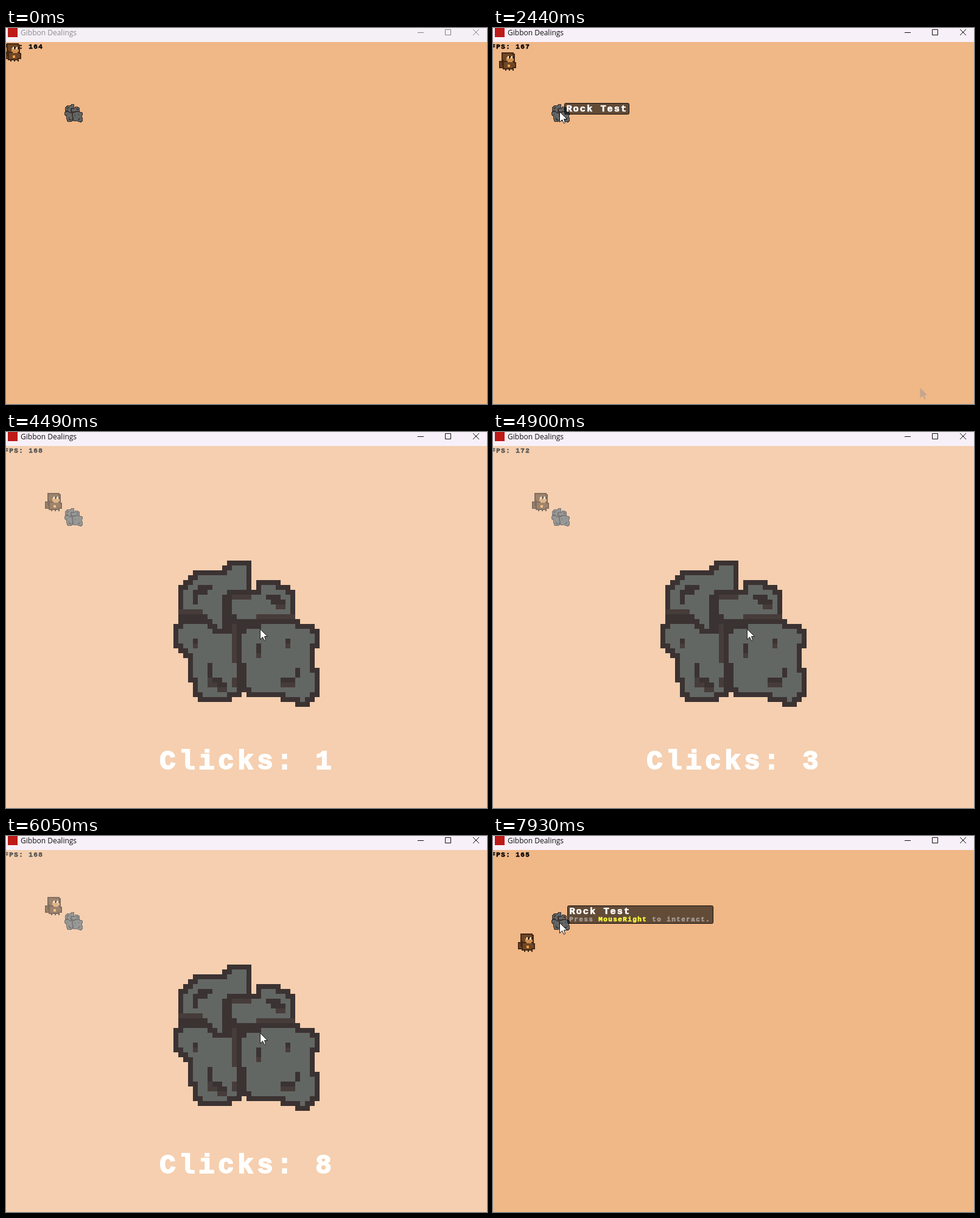
These frames come from a looping animation (790x617 px, 8 s). An HTML page with a canvas:

```html
<!DOCTYPE html>
<html lang="en">
<head>
<meta charset="utf-8">
<title>Gibbon Dealings</title>
<style>
  html, body { margin: 0; width: 100%; height: 100%; overflow: hidden; background: #f0b787; }
  canvas { display: block; }
</style>
</head>
<body>
<canvas id="stage" width="790" height="617"></canvas>
<script>
const ctx = document.getElementById('stage').getContext('2d');
const LOOP = 8000, FOCUS = 2240, IN_RANGE = 2800, GAME_ON = 3740, GAME_OFF = 7070;

function sprite(w, h, paint) {
  const c = document.createElement('canvas');
  c.width = w;
  c.height = h;
  paint(c.getContext('2d'));
  return c;
}

// Fills a path cell by cell, with an optional one-cell outline around it.
function lump(g, d, fill, edge) {
  const path = new Path2D(d), cells = [];
  for (let y = 0; y < g.canvas.height; y++) {
    for (let x = 0; x < g.canvas.width; x++) {
      if (g.isPointInPath(path, x + 0.5, y + 0.5)) cells.push([x, y]);
    }
  }
  if (edge) {
    g.fillStyle = edge;
    for (const [x, y] of cells) g.fillRect(x - 1, y - 1, 3, 3);
  }
  g.fillStyle = fill;
  for (const [x, y] of cells) g.fillRect(x, y, 1, 1);
}

function lines(g, d, color) {
  g.strokeStyle = color;
  g.stroke(new Path2D(d));
}

// Four boulders from back to front, then cracks.
const makeRock = (fill, dark, mid) => sprite(30, 30, g => {
  lump(g, 'M2.2 13H12V21H13V27H12L10.9 28H6.2L5 27V24H4V19L1 16.4V14Z', fill, dark);
  lump(g, 'M18 13H24L28.9 15H29V17H28V23H29V27H28.9L27 28.9H26V28H23V27H16L15 25V21H14V15L18 13.5Z', fill, dark);
  lump(g, 'M12 1H15V7H10V14H9L6.7 11H2V6H2.2L5.2 3H11Z', fill, dark);
  lump(g, 'M18 5H20.5L24 7V12H13.2L12 11V7H18Z', fill, dark);
  lines(g, 'M5 5.5H8M4 6.5H7M4.5 7V9M19 7.5H22M20 8.5H23M10 13.5H14M10 14.5H15', dark);
  lines(g, 'M4.5 16V17M23.5 16V17M17.5 17V19M7.5 21V24.5H10M9 25.5H11M25.5 22V24M22 24.5H25', dark);
  lines(g, 'M12 7.5H16M21 9.5H23M1 10.5H6M17 11.5H25M12.5 13V21M12.5 24V26', mid);
  lines(g, 'M4.5 17V18M23.5 17V18M17.5 19V20M7 25.5H9M9 26.5H11M22 25.5H25', mid);
});
const rock = makeRock('#636763', '#3b3232', '#463c3a');
const redRock = makeRock('#b32d30', '#6b2224', '#7b2628');

const monkey = sprite(14, 15, g => {
  const edge = '#452813', fur = '#704725', skin = '#d0904f';
  lump(g, 'M1 8H2V11H4V12H2L1 11Z', fur, edge);
  lump(g, 'M4 8H11L13 10V12H11V13H5L4 12Z', fur, edge);
  lump(g, 'M4 1H10L12 3V6L11 7H5L3 6V2Z', fur, edge);
  lump(g, 'M6 4H12V6L11 8H7L6 6Z', skin);
  lump(g, 'M7 10H9V12H7Z', '#eda044');
  lines(g, 'M7.5 3V5M10.5 3V5', '#fff1d2');
  lines(g, 'M8.5 3V5M11.5 3V5M5 14.5H6M8 14.5H9M11 14.5H12', '#2f1b0f');
});

// Position after a chain of moves, each { at, end, to }.
const linear = k => k;
const smooth = k => k * k * (3 - 2 * k);
function travel(t, from, moves, ease) {
  let [x, y] = from;
  for (const { at, end, to } of moves) {
    const k = ease(Math.min(1, Math.max(0, (t - at) / (end - at))));
    x += (to[0] - x) * k;
    y += (to[1] - y) * k;
  }
  return [Math.round(x), Math.round(y)];
}

const pointerMoves = [
  { at: 140, end: 1060, to: [110, 138] },
  { at: 3780, end: 4270, to: [418, 324] },
  { at: 6000, end: 6700, to: [417, 326] },
  { at: 7120, end: 7660, to: [110, 143] }
];
const monkeyMoves = [
  { at: FOCUS, end: 3260, to: [64, 100] },
  { at: 7170, end: 7900, to: [41, 160] }
];

function fps(t) {
  const r = Math.sin(Math.floor(t / 70) * 127.1 + 3) * 43758.5453;
  return 162 + Math.floor((r - Math.floor(r)) * 13);
}

// Heavy game lettering on an eight pixel pitch, times the scale.
function label(str, x, y, scale, color) {
  const size = 11 * scale;
  ctx.font = `bold ${size}px "Liberation Mono", "DejaVu Sans Mono", monospace`;
  ctx.letterSpacing = `${size * 0.127}px`;
  ctx.fillStyle = ctx.strokeStyle = color;
  ctx.lineWidth = size * 0.045;
  ctx.fillText(str, x + scale * 0.3, y);
  ctx.strokeText(str, x + scale * 0.3, y);
  ctx.letterSpacing = '0px';
}

const arrowPath = new Path2D('M0 0V17L4 13L7 19L9 18L7 12H12Z');
function arrow(x, y, fill, line) {
  ctx.save();
  ctx.translate(x - 0.5, y - 0.5);
  ctx.fillStyle = fill;
  ctx.fill(arrowPath);
  if (line) {
    ctx.strokeStyle = line;
    ctx.lineWidth = 1;
    ctx.stroke(arrowPath);
  }
  ctx.restore();
}

function tooltip(cx, cy, full) {
  const x = cx + (full ? 12 : 7), y = cy - (full ? 29 : 15);
  const w = full ? 240 : 107, h = full ? 30 : 19;
  ctx.beginPath();
  ctx.roundRect(x + 0.5, y + 0.5, w - 1, h - 1, 2);
  ctx.fillStyle = 'rgba(0,0,0,.59)';
  ctx.fill();
  ctx.strokeStyle = '#17110d';
  ctx.lineWidth = 1;
  ctx.stroke();
  label('Rock Test', x + 3, y + 14, 1.4, '#fff');
  if (full) {
    label('Press', x + 3, y + 26, 1, '#a69d96');
    label('MouseRight', x + 51, y + 26, 1, '#ffff38');
    label('to interact.', x + 139, y + 26, 1, '#a69d96');
  }
}

function titleBar(t) {
  const active = t >= FOCUS;
  ctx.fillStyle = active ? '#f8f0f9' : t < 140 ? '#f5f0f6' : '#f3f3f3';
  ctx.fillRect(0, 0, 790, 23);
  ctx.fillStyle = '#bd1a18';
  ctx.fillRect(3, 0, 16, 15);
  ctx.font = '12px "Open Sans", "Noto Sans", sans-serif';
  ctx.fillStyle = active ? '#111' : '#8d8a8d';
  ctx.fillText('Gibbon Dealings', 24, 12);
  ctx.strokeStyle = active ? '#111' : '#858285';
  ctx.lineWidth = 1;
  ctx.stroke(new Path2D('M676 7.5H686M721.5 2.5H730.5V11.5H721.5ZM767 2L777 12M777 2L767 12'));
}

function clicker(t) {
  ctx.fillStyle = 'rgba(255,255,255,.33)';
  ctx.fillRect(0, 23, 790, 594);
  ctx.drawImage(rock, 275, 211, 240, 240);
  const clicks = Math.min(10, Math.max(0, 1 + Math.floor((t - 4400) / 235)));
  const str = 'Clicks: ' + clicks;
  label(str, 395 - str.length * 16, 553, 4, '#fff');
}

function draw(t) {
  const playing = t >= GAME_ON && t < GAME_OFF;
  const [cx, cy] = travel(t, [702, 591], pointerMoves, smooth);
  const [mx, my] = travel(t, [-3, 25], monkeyMoves, linear);
  const hover = cx >= 96 && cx < 126 && cy >= 125 && cy < 155;

  ctx.imageSmoothingEnabled = false;
  ctx.fillStyle = '#f0b787';
  ctx.fillRect(0, 0, 790, 617);
  label('FPS: ' + fps(t), -3, 34, 1, '#000');
  ctx.drawImage(rock, 96, 125);
  if (t >= IN_RANGE && t < GAME_ON) ctx.drawImage(redRock, 98, 127, 26, 26);
  ctx.drawImage(monkey, mx, my, 28, 30);
  if (t >= 210 && t < GAME_ON) arrow(702, 591, 'rgba(150,150,150,.5)');

  if (playing) clicker(t);
  else if (hover) tooltip(cx, cy, t >= IN_RANGE);

  titleBar(t);
  if (t >= 70) arrow(cx, cy, '#fff', '#1a1a1a');
}

const start = performance.now();
function tick() {
  draw((performance.now() - start) % LOOP);
  requestAnimationFrame(tick);
}
tick();
</script>
</body>
</html>
```
